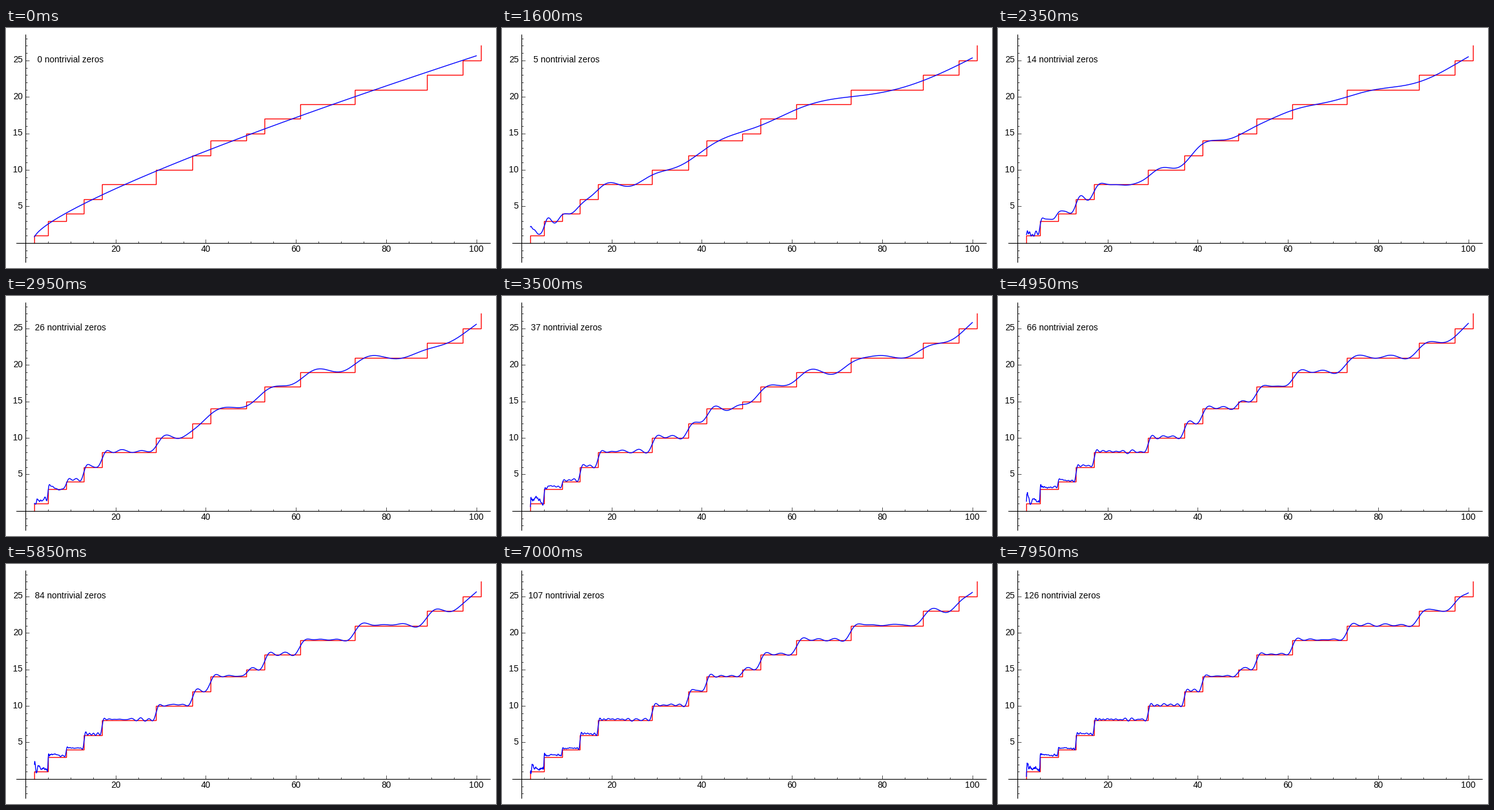
Animation of 781 by 384 pixels, one loop 8000 ms. Source, as a matplotlib script:

```python
import numpy as np
import matplotlib.pyplot as plt
from matplotlib.animation import FuncAnimation

W, H, DPI = 781, 384, 100
STEP_MS, FRAMES = 50, 160
X_MAX, MAX_ZEROS = 100, 126
MOEBIUS = {1: 1, 2: -1, 3: -1, 5: -1, 6: 1, 7: -1, 10: 1}
BLACK, RED, BLUE = "#000000", "#ff0000", "#0000ff"


def px(x):
    return 30.97 + 7.187 * np.asarray(x)


def py(y):
    return 343.9 - 11.683 * np.asarray(y)


# --- zeros of the Dedekind zeta function of Q(i) = zeta(s) * L(s, chi_4) ---

def hurwitz(s, a, terms=100):
    """Euler-Maclaurin evaluation of the Hurwitz zeta function."""
    w = terms + a
    total = w ** (1 - s) / (s - 1) + w ** -s / 2
    for k in range(terms):
        total = total + (k + a) ** -s
    term = s * w ** (-s - 1)
    for j, c in enumerate((1 / 12, -1 / 720, 1 / 30240, -1 / 1209600), 1):
        total = total + c * term
        term = term * (s + 2 * j - 1) * (s + 2 * j) / w ** 2
    return total


def critical_zeros(values, s, parity, conductor):
    """Sign changes of the Hardy function on the critical line."""
    t = s.imag
    z = (s + parity) / 2
    log_gamma = (z - 0.5) * np.log(z) - z + 1 / (12 * z) - 1 / (360 * z ** 3)
    theta = log_gamma.imag + t / 2 * np.log(conductor / np.pi)
    hardy = (np.exp(1j * theta) * values).real
    i = np.nonzero(hardy[:-1] * hardy[1:] < 0)[0]
    return t[i] + (t[i + 1] - t[i]) * hardy[i] / (hardy[i] - hardy[i + 1])


def dedekind_zeros():
    s = 0.5 + 1j * np.arange(3, 155, 0.02)
    zeta = hurwitz(s, 1.0)
    l_chi = 4 ** -s * (hurwitz(s, 0.25) - hurwitz(s, 0.75))
    both = [critical_zeros(zeta, s, 0, 1), critical_zeros(l_chi, s, 1, 4)]
    return np.sort(np.concatenate(both))[:MAX_ZEROS]


# --- explicit formula ---

def re_ei(z):
    """Real part of the exponential integral."""
    z = np.asarray(z, dtype=complex)
    out = np.empty(z.shape)
    near = np.abs(z) < 20

    a = z[near]
    total, power = np.euler_gamma + np.log(a), np.ones_like(a)
    for k in range(1, 85):
        power = power * a / k
        total = total + power / k
    out[near] = total.real

    b = z[~near]
    total, power = np.zeros_like(b), np.ones_like(b)
    for k in range(1, 19):
        total = total + power
        power = power * k / b
    out[~near] = (np.exp(b) / b * total).real
    return out


def trivial_part(v):
    """Integral of dt / (t (exp(t) - 1)) from v to infinity."""
    w = np.linspace(np.log(0.1), np.log(60), 6000)
    f = 1 / np.expm1(np.exp(w))
    pieces = (f[1:] + f[:-1]) / 2 * np.diff(w)
    tail = np.append(np.cumsum(pieces[::-1])[::-1], 0)
    return np.interp(np.log(v), w, tail)


def approximations(x):
    """Row n is the prime count estimate using the first n zeros."""
    u = np.log(x)
    rho = 0.5 + 1j * dedekind_zeros()
    base = np.zeros_like(x)
    waves = np.zeros((len(rho), len(x)))
    for n, mu in MOEBIUS.items():
        base += mu / n * (re_ei(u / n) - np.log(2) + trivial_part(2 * u / n))
        waves -= 2 * mu / n * re_ei(np.outer(rho, u / n))
    return np.vstack([base, base + np.cumsum(waves, axis=0)])


def prime_staircase():
    """Prime ideals of the Gaussian integers counted by norm."""
    primes = [p for p in range(2, 102) if all(p % d for d in range(2, p))]
    jumps = {}
    for p in primes:
        if p % 4 == 3:
            jumps[p * p] = 1
        else:
            jumps[p] = 2 if p > 2 else 1
    xs, ys, count = [], [], 0
    for norm in sorted(q for q in jumps if q <= 101):
        xs += [norm, norm]
        ys += [count, count + jumps[norm]]
        count += jumps[norm]
    return xs, ys


def zeros_shown(frame):
    t = frame * STEP_MS
    if t < 1400:
        return int(t >= 1000) + int(t >= 1200)
    if t < 2200:
        return 3 + (t - 1400) // 100
    return 11 + (t - 2200) // 50


# --- drawing ---

plt.rcParams["font.family"] = "Liberation Sans"
plt.rcParams["font.size"] = 10

fig = plt.figure(figsize=(W / DPI, H / DPI), dpi=DPI, facecolor="white")
ax = fig.add_axes([0, 0, 1, 1])
ax.set_xlim(0, W)
ax.set_ylim(H, 0)
ax.axis("off")


def stroke(xs, ys, width):
    ax.plot(xs, ys, color=BLACK, lw=width, solid_capstyle="butt", zorder=4)


def draw_axes():
    x0, y0 = px(0), py(0)
    stroke([16, 772], [y0, y0], 0.8)
    stroke([x0, x0], [10, 375], 0.8)
    for x in range(5, 101, 5):
        major = x % 20 == 0
        stroke([px(x)] * 2, [y0, y0 - (6 if major else 3)], 0.5)
        if major:
            ax.text(px(x), 354.3, str(x), ha="center", va="center")
    for y in range(-2, 29):
        major = y % 5 == 0
        stroke([x0, x0 + (6 if major else 3)], [py(y)] * 2, 0.5)
        if major and y:
            ax.text(26.5, py(y) - 0.5, str(y), ha="right", va="center")


draw_axes()
stair_x, stair_y = prime_staircase()
ax.plot(px(stair_x), py(stair_y), color=RED, lw=1, solid_joinstyle="miter")

grid = np.geomspace(2, X_MAX, 1200)
curves = approximations(grid)
curve, = ax.plot(px(grid), py(curves[0]), color=BLUE, lw=1, zorder=3)
caption = ax.text(px(10), py(25) - 0.5, "", ha="center", va="center")


def update(frame):
    n = zeros_shown(frame)
    curve.set_ydata(py(curves[n]))
    caption.set_text(f"{n} nontrivial zeros")
    return curve, caption


anim = FuncAnimation(fig, update, frames=FRAMES, interval=STEP_MS,
                     repeat=True, repeat_delay=0)
plt.show()
```
